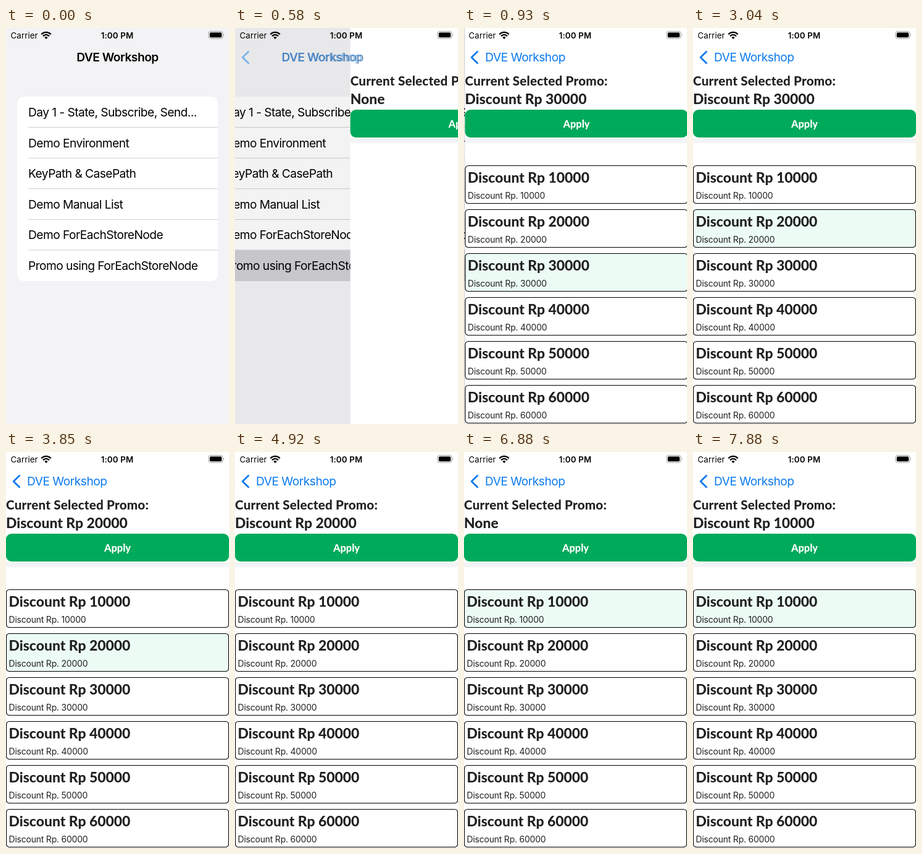
Recreate the animation shown at these times as an HTML page. Size 361 by 640 pixels, loop 7910 ms.

```html
<!DOCTYPE html>
<html lang="en">
<head>
<meta charset="utf-8">
<title>Promo list</title>
<style>
html, body { margin: 0; width: 100%; height: 100%; overflow: hidden; background: #fff; }
svg { display: block; width: 361px; height: 640px; }
text { font-family: Inter, "Liberation Sans", sans-serif; white-space: pre; }
.status { font-size: 13.3px; letter-spacing: .1px; }
.time { font-size: 13.3px; font-weight: 600; letter-spacing: .15px; text-anchor: middle; }
.row { font-size: 19.2px; letter-spacing: -.56px; }
.nav { font-size: 19.2px; letter-spacing: -.5px; }
.bold { font-weight: 600; }
.label, .pick, .name, .apply { font-family: Lato, "Open Sans", sans-serif; font-weight: 800; fill: #212121; }
.label { font-size: 20.6px; letter-spacing: .2px; }
.pick, .name { font-size: 22.9px; }
.apply { font-size: 16.4px; fill: #fff; text-anchor: middle; }
.note { font-size: 14px; letter-spacing: -.22px; fill: #212121; }
</style>
</head>
<body>
<svg id="stage" viewBox="0 0 361 640"></svg>
<script>
const NS = 'http://www.w3.org/2000/svg';
const LOOP = 7910, W = 361, PUSH = 485, RATE = 0.0171;
const BLUE = '#0a7aee';
const stage = document.getElementById('stage');

function add(parent, tag, attrs = {}, content = '') {
  const el = document.createElementNS(NS, tag);
  for (const key in attrs) el.setAttribute(key, attrs[key]);
  el.textContent = content;
  return parent.appendChild(el);
}
const group = parent => add(parent, 'g');
const box = (parent, x, y, width, height, fill, more) =>
  add(parent, 'rect', { x, y, width, height, fill, ...more });
const label = (parent, cls, x, y, content) => add(parent, 'text', { class: cls, x, y }, content);
const line = (parent, d, stroke, width, more) =>
  add(parent, 'path', { d, stroke, 'stroke-width': width, fill: 'none', ...more });

// Menu screen
const menu = group(stage);
box(menu, 0, 0, W + 110, 640, '#f3f3f5');
box(menu, 18, 111, 325, 298, '#fff', { rx: 11 });
const pressedRow = add(menu, 'path', { d: 'M18 359.3H343V398a11 11 0 0 1-11 11H29a11 11 0 0 1-11-11Z', fill: '#d1d1d5' });
['Day 1 - State, Subscribe, Send...', 'Demo Environment', 'KeyPath & CasePath',
  'Demo Manual List', 'Demo ForEachStoreNode', 'Promo using ForEachStoreNode'
].forEach((name, i) => {
  const y = 111 + i * 49.6;
  if (i) box(menu, 36, y - .4, 307, .8, '#c4c4c6');
  label(menu, 'row', 36, y + 32, name);
});
const dim = box(stage, 0, 0, W, 640, '#000');

// Promo screen
const promo = group(stage);
box(promo, 0, 0, W, 640, '#fff');
label(promo, 'label', 0, 93, 'Current Selected Promo:');
const pick = label(promo, 'pick', 0, 123, '');
box(promo, 0, 178, W, 8, '#f3f4f5');
const button = group(promo);
box(button, 0, 132, W, 45, '#00aa5b', { rx: 9 });
label(button, 'apply', 180.5, 160.5, 'Apply');
const list = group(promo);
const cards = [1, 2, 3, 4, 5, 6].map((n, i) => {
  const y = 222 + i * 71;
  const card = box(list, .5, y + .5, W - 1, 61, '#fff', { rx: 5, stroke: '#000', 'stroke-width': 1.1 });
  label(list, 'name', 4.5, y + 27.5, `Discount Rp ${n}0000`);
  label(list, 'note', 4.5, y + 54, `Discount Rp. ${n}0000`);
  return card;
});

// Navigation and status bars
const TITLE = 'DVE Workshop';
const heading = label(stage, 'nav bold', 0, 54, TITLE);
const back = group(stage);
const backText = label(back, 'nav', 0, 54, TITLE);
backText.setAttribute('fill', BLUE);
line(back, 'M21.7 38.2 12.2 47.5 21.7 56.8', BLUE, 2.8, { 'stroke-linecap': 'round', 'stroke-linejoin': 'round' });
label(stage, 'status', 7.5, 16.5, 'Carrier');
label(stage, 'time', 180, 16.5, '1:00 PM');
line(stage, 'M57.3 10.2a10.6 10.6 0 0 1 15.4 0M60 13.1a6.9 6.9 0 0 1 10 0', '#000', 2.3);
add(stage, 'path', { d: 'M62.3 15.3a3.9 3.9 0 0 1 5.4 0L65 18.1Z' });
box(stage, 328, 5.5, 23, 11.5, 'none', { rx: 3.2, stroke: '#999', 'stroke-width': 1 });
box(stage, 329.8, 7.2, 19.4, 8.1, '#000', { rx: 1.8 });
add(stage, 'path', { d: 'M352.4 9.3q1.8 1.9 0 3.9Z', fill: '#999' });

// start, chosen amount, highlighted card, button held, cards visible
const steps = [
  [0, 0, 0], [470, 0, 0], [580, 0, 0], [690, 0, 0], [810, 0, 0],
  [930, 3, 3, 0, 1], [3040, 3, 2, 0, 1], [3740, 3, 2, 1, 1], [3850, 2, 2, 0, 1],
  [4920, 2, 0, 0, 1], [5590, 2, 0, 1, 1], [5710, 0, 0, 0, 1],
  [6880, 0, 1, 0, 1], [7770, 0, 1, 1, 1], [7880, 1, 1, 0, 1]
];
const headingWidth = heading.getComputedTextLength();

function draw(t) {
  const [start, amount, lit, held, loaded] = steps.findLast(s => s[0] <= t);
  const k = Math.max(0, start - PUSH) * RATE;
  const left = start >= 3040 ? 0 : (1 + k) * Math.exp(-k);
  const done = 1 - left;
  const titleX = 180.5 - headingWidth / 2;

  menu.setAttribute('transform', `translate(${-108 * done})`);
  pressedRow.setAttribute('opacity', start >= 470 ? 1 : 0);
  dim.setAttribute('opacity', .1 * done);
  promo.setAttribute('transform', `translate(${W * left})`);
  pick.textContent = amount ? `Discount Rp ${amount}0000` : 'None';
  button.setAttribute('opacity', held ? .7 : 1);
  list.setAttribute('opacity', loaded ? 1 : 0);
  cards.forEach((card, i) => card.setAttribute('fill', i + 1 === lit ? '#ecfcf5' : '#fff'));

  const x = 34 + (titleX - 34) * left;
  heading.setAttribute('x', x);
  heading.setAttribute('opacity', left);
  heading.setAttribute('fill', `rgb(0 ${122 * done} ${255 * done})`);
  backText.setAttribute('x', x);
  back.setAttribute('opacity', done);
}

function tick(now) {
  draw(now % LOOP);
  requestAnimationFrame(tick);
}
draw(0);
requestAnimationFrame(tick);
</script>
</body>
</html>
```
